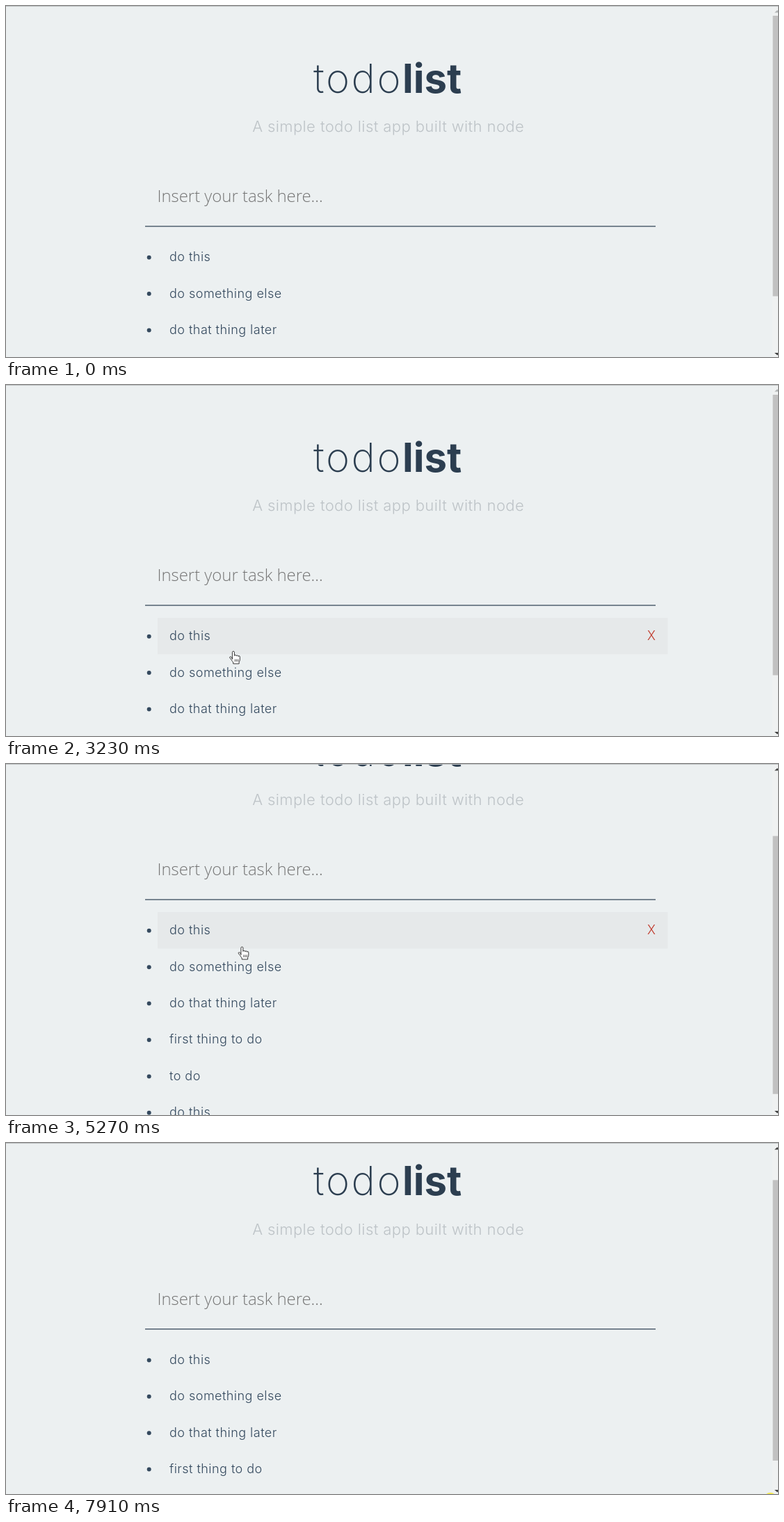
Recreate the animation shown at these times as an HTML page. Size 1110 by 505 pixels, loop 8110 ms.

```html
<!DOCTYPE html>
<html lang="en">
<head>
<meta charset="utf-8">
<title>todolist</title>
<style>
  html, body { margin: 0; width: 100%; height: 100%; overflow: hidden; background: #ecf0f1; }
  svg { display: block; width: 100%; height: 100%; }
  text { white-space: pre; font-family: Inter, sans-serif; fill: #2c3e50; }
  .thin { font-size: 58px; font-weight: 200; letter-spacing: 2.7px; }
  .bold { font-size: 58px; font-weight: 700; }
  .sub { font-size: 22px; font-weight: 300; letter-spacing: .41px; fill: #bdc3c7; text-anchor: middle; }
  .input { font: 350 23.9px "Open Sans", sans-serif; }
  .hint { fill: #757575; }
  .item { font-size: 18px; font-weight: 350; letter-spacing: .47px; fill: #34495e; }
  .done { fill: #bdc3c7; text-decoration: line-through; }
  .del { font-size: 18px; font-weight: 300; fill: #c0392b; text-anchor: middle; }
</style>
</head>
<body>
<svg id="stage" viewBox="0 0 1110 505"></svg>
<script>
const LOOP = 8110, STEPS = 40, VIEW = 505;
const ROW_TOP = 335, ROW_H = 52.4, BASE_SCROLL = 95.7;
const TASKS = ['do this', 'do something else', 'do that thing later', 'first thing to do', 'to do'];
const NEW_TASK = 'do this';
const stage = document.getElementById('stage');

// Pointer stops, eased in between; a stop may be a click
const stop = (k, x, y, click = false) => ({ k, x, y, click });
const STOPS = [
  stop(1, 420, 384), stop(3, 283, 366, true), stop(11, 350, 417, true), stop(13, 350, 418, true),
  stop(15, 283, 367, true), stop(16, 327, 383), stop(20, 364.5, 192, true), stop(25, 364.5, 192),
  stop(28, 268, 466, true), stop(31, 936, 473), stop(32, 929, 473, true), stop(35, 928, 471),
  stop(39, 1099, 513, true)
];

const HAND = 'M-1.6 11.5V1.6a1.5 1.5 0 0 1 3 0V6.5q0-1 1.3-1 1.5 0 1.6 1.4.2-.9 1.3-.9 1.4 0 1.5 1.5.2-.8 1-.8 1.2 0 1.2 1.5V12q0 2-1.2 3.5V18H-.3V16q-1.2-1.2-2.6-3.6L-5 9.8q-.8-1.3.2-1.8 1-.5 1.9.5z';
const FINGERS = 'M2.4 11.5v3.5M4.6 11.5v3.5M6.8 11.5v3.5';
const BEAM = 'M-3.6-7.5h2.4L0-6.7 1.2-7.5H3.6M0-6.7V6.7M-3.6 7.5h2.4L0 6.7 1.2 7.5H3.6';
const ARROW = 'M0 0V15.5L3.6 12.2 6 17.6 8.4 16.5 6 11.3H11z';

const within = (v, from, to) => v >= from && v <= to;
const mix = (a, b, u) => a + (b - a) * u;
const ease = u => { u = Math.max(0, Math.min(1, u)); return u * u * (3 - 2 * u); };
const rect = (x, y, w, h, fill) => `<rect x="${x}" y="${y}" width="${w}" height="${h}" fill="${fill}"/>`;
const text = (x, y, cls, str) => `<text x="${x}" y="${y}" class="${cls}">${str}</text>`;
const path = (d, fill, stroke, width = .9) =>
  `<path d="${d}" fill="${fill}" stroke="${stroke}" stroke-width="${width}" stroke-linejoin="round"/>`;

const tasksAt = k => within(k, 25, 32) ? [...TASKS, NEW_TASK] : TASKS;
const maxScroll = count => BASE_SCROLL + (count - TASKS.length) * ROW_H;

function scrollAt(k) {
  const down = BASE_SCROLL * ease((k - 16) / 2) + ROW_H * ease((k - 25) / 2);
  return Math.min(down, maxScroll(tasksAt(k).length)) - 46.4 * ease(k - 38);
}

function pointerAt(k) {
  if (k < STOPS[0].k) return null;
  const i = Math.max(1, STOPS.findIndex(s => s.k >= k));
  const a = STOPS[i - 1], b = STOPS[i], u = ease((k - a.k) / (b.k - a.k));
  return { x: mix(a.x, b.x, u), y: mix(a.y, b.y, u) };
}

function rowUnder(p, k) {
  if (!p || !within(p.x, 218, 951)) return -1;
  return Math.floor((p.y + scrollAt(k) - ROW_TOP) / ROW_H);
}

// Each click on a task's text flips its state
function isDone(row, k) {
  const flips = STOPS.filter(s => s.click && s.k <= k && s.x < 900 && rowUnder(s, s.k) === row);
  return flips.length % 2 === 1;
}

function drawRow(task, row, hovered, done) {
  const top = ROW_TOP + row * ROW_H, mid = top + 26.4;
  return (hovered ? rect(218, top, 733.5, ROW_H, '#e6e9ea') : '')
    + `<circle cx="205.7" cy="${mid + .3}" r="3" fill="${done ? '#bdc3c7' : '#34495e'}"/>`
    + text(235, mid + 5.8, done ? 'item done' : 'item', task)
    + (hovered ? text(928, mid + 5.8, 'del', 'X') : '');
}

function drawScrollbar(scroll, max) {
  const track = 480, h = track * VIEW / (VIEW + max);
  const y = 14 + scroll / max * (track - h);
  const tone = active => active ? '#404040' : '#b0b3b4';
  return rect(1102, 1, 8, 504, '#eff1f1') + rect(1102.5, y, 7.5, h, '#c1c1c1')
    + `<path d="M1105 9.5L1109 6L1113 9.5z" fill="${tone(scroll > 0)}"/>`
    + `<path d="M1105 499L1109 502.5L1113 499z" fill="${tone(scroll < max)}"/>`;
}

function drawPointer(p, kind, clicked) {
  const shapes = {
    hand: path(HAND, '#fff', '#222') + path(FINGERS, 'none', '#222', .8),
    beam: path(BEAM, 'none', '#111', 1.4),
    arrow: path(ARROW, '#fff', '#222')
  };
  return (clicked ? `<circle cx="${p.x}" cy="${p.y}" r="10" fill="#f5e61e" opacity=".8"/>` : '')
    + `<g transform="translate(${p.x} ${p.y})">${shapes[kind]}</g>`;
}

function draw(k) {
  const scroll = scrollAt(k), p = pointerAt(k), tasks = tasksAt(k), hover = rowUnder(p, k);
  const overInput = p && within(p.x, 200, 934) && within(p.y + scroll, 238, 317);
  const kind = overInput ? 'beam' : hover >= 0 ? 'hand' : 'arrow';
  const focused = within(k, 20, 24);
  const typed = focused ? NEW_TASK.slice(0, Math.max(0, 2 * (k - 21) + 1)) : '';

  stage.innerHTML = rect(0, 0, 1110, VIEW, '#ecf0f1')
    + `<g transform="translate(0 ${-scroll})">`
    + text(442, 124.5, 'thin', 'todo') + text(570, 124.5, 'bold', 'list')
    + text(549.7, 181, 'sub', 'A simple todo list app built with node')
    + text(217.5, 282, typed ? 'input' : 'input hint', typed || 'Insert your task here...')
    + rect(200, 316.4, 734, 1.2, '#2c3e50')
    + tasks.map((t, i) => drawRow(t, i, i === hover, isDone(i, k))).join('')
    + (focused ? '<rect id="caret" y="260" width="1" height="27" fill="#2c3e50"/>' : '')
    + '</g>' + drawScrollbar(scroll, maxScroll(tasks.length)) + rect(0, 0, 1110, 1, '#bfc3c5')
    + (p ? drawPointer(p, kind, STOPS.some(s => s.click && s.k === k)) : '');

  if (focused) {
    const width = typed ? stage.querySelector('.input').getComputedTextLength() : 0;
    stage.querySelector('#caret').setAttribute('x', Math.floor(217.5 + width - 1));
  }
}

let shown = -1;
const start = performance.now();
function tick() {
  const t = (performance.now() - start) % LOOP;
  const k = Math.min(STEPS - 1, Math.floor((t + 20) / LOOP * STEPS));
  if (k !== shown) draw(shown = k);
  requestAnimationFrame(tick);
}
tick();
</script>
</body>
</html>
```
